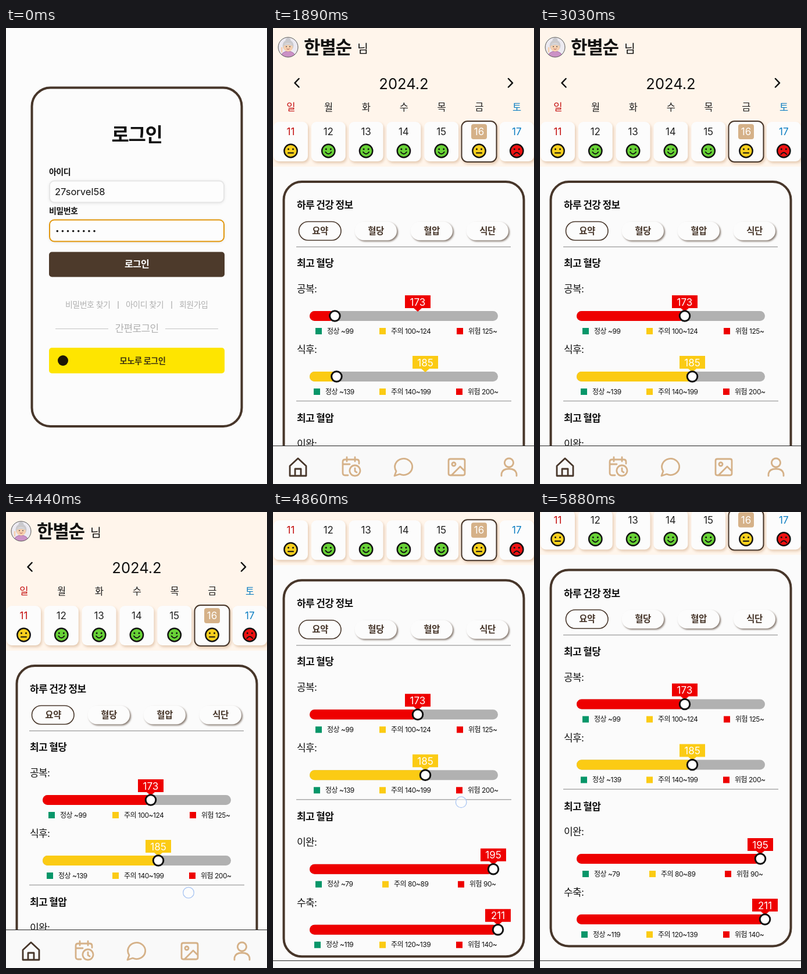
Recreate the animation shown at these times as an HTML page. Size 449 px wide and 783 px high, loop 5910 ms.

```html
<!DOCTYPE html>
<html lang="ko">
<head>
<meta charset="utf-8">
<title>로그인과 하루 건강 정보</title>
<style>
  html, body { margin: 0; width: 100%; height: 100%; overflow: hidden; background: #fcfcfc; }
  svg { display: block; }
  text { font-family: Inter, "Noto Sans CJK KR", "Noto Sans CJK", sans-serif; white-space: pre; }
  .ko { letter-spacing: -.04em; }
  .soft { filter: drop-shadow(0 1px 2px rgba(0, 0, 0, .08)); }
  .day { filter: drop-shadow(2px 3px 2px rgba(190, 140, 95, .4)); }
  .pill { filter: drop-shadow(2px 2px 1.5px rgba(60, 40, 25, .6)); }
  #stage { position: relative; width: 449px; height: 783px; overflow: hidden; }
  #stage > svg { position: absolute; left: 0; top: 0; }
  #dialog { position: absolute; left: 12px; width: 425px; overflow: hidden; border-radius: 24px;
    background: #fafafa; box-shadow: 0 0 3px rgba(0, 0, 0, .35); }
  #dialog text { font-family: "Noto Sans", "Noto Sans CJK KR", "Noto Sans CJK", sans-serif; }
</style>
</head>
<body>
<div id="stage">
  <svg id="login" width="449" height="783"></svg>
  <svg id="home" width="449" height="783"></svg>
  <div id="dialog"></div>
</div>
<script>
const LOOP = 5910;
const BROWN = '#47362a', TAN = '#d5b188', RED = '#ee0000', YELLOW = '#fbcb14', GREEN = '#079669';
const $ = id => document.getElementById(id);
const clamp = (v, lo = 0, hi = 1) => Math.min(hi, Math.max(lo, v));

const text = (x, y, size, str, { fill = '#111', weight = 400, anchor = 'start' } = {}) =>
  `<text x="${x}" y="${y}" font-size="${size}" fill="${fill}" font-weight="${weight}" text-anchor="${anchor}"` +
  `${/[가-힣]/.test(str) ? ' class="ko"' : ''}>${str}</text>`;
const bold = (x, y, size, str, fill = '#111') => text(x, y, size, str, { fill, weight: 700 });
const boldMid = (x, y, size, str, fill = '#111') => text(x, y, size, str, { fill, weight: 700, anchor: 'middle' });
const mid = (x, y, size, str, fill = '#111') => text(x, y, size, str, { fill, anchor: 'middle' });
const rect = (x, y, w, h, rx, fill, extra = '') =>
  `<rect x="${x}" y="${y}" width="${w}" height="${h}" rx="${rx}" fill="${fill}" ${extra}/>`;
const circle = (x, y, r, fill, extra = '') => `<circle cx="${x}" cy="${y}" r="${r}" fill="${fill}" ${extra}/>`;
const path = (d, stroke, width, extra = '') =>
  `<path d="${d}" fill="none" stroke="${stroke}" stroke-width="${width}" ${extra}/>`;
const ROUND = 'stroke-linecap="round" stroke-linejoin="round"';

function loginScreen() {
  const gray = '#b0b0b0';
  const dots = Array.from({ length: 8 }, (_, i) => circle(88.3 + i * 9.1, 348.8, 1.8, '#111')).join('');
  return rect(0, 0, 449, 783, 0, '#fcfcfc') + `<g id="form">` +
    rect(44.5, 102.5, 361, 581.5, 32, '#fcfcfc', `stroke="${BROWN}" stroke-width="4"`) +
    boldMid(225, 195, 33, '로그인') +
    bold(74, 251.5, 14, '아이디') +
    rect(75, 262.5, 300, 37, 8, '#fdfdfd', 'class="soft" stroke="#e6e6e6" stroke-width="2"') +
    text(84, 287, 16.5, '27sorvel58') +
    bold(74, 318.5, 14, '비밀번호') +
    rect(75, 329.5, 300, 37, 8, '#fdfdfd', 'id="password" class="soft" stroke-width="2"') + dots +
    rect(155, 337, 1.6, 22, 0, '#111', 'id="caret"') +
    rect(74, 384.5, 302, 43, 5, '#4d3a2b') +
    rect(74, 384.5, 302, 43, 5, '#fff', 'id="press"') +
    boldMid(225, 411, 16, '로그인', '#fff') +
    [[102, '비밀번호 찾기'], [206, '아이디 찾기'], [298, '회원가입']]
      .map(([x, s]) => text(x, 480, 14, s, { fill: gray })).join('') +
    path('M193 469V482M285 469V482', gray, 1.3) +
    path('M85 516.5H176M274 516.5H365', '#c4c4c4', 1) +
    mid(225, 521.5, 17, '간편로그인', gray) +
    rect(74, 549, 302, 44, 5, '#fee500') +
    circle(98, 571, 9, '#1d1606') +
    boldMid(235, 577, 14.4, '모노루 로그인', '#43390f') + '</g>';
}

function face(x, y, mood) {
  const fill = { ok: '#f7cf1d', good: '#68d236', bad: '#ee1111' }[mood];
  const mouth = { ok: 'M-4.5 3.5H4.5', good: 'M-5 2Q0 8.5 5 2', bad: 'M-5 6Q0 -.5 5 6' }[mood];
  return `<g transform="translate(${x} ${y})">` + circle(0, 0, 11.2, fill, 'stroke="#111" stroke-width="2.4"') +
    circle(-4, -3, 1.5, '#111') + circle(4, -3, 1.5, '#111') + path(mouth, '#111', 2, ROUND) + '</g>';
}

function calendar() {
  const moods = ['ok', 'good', 'good', 'good', 'good', 'ok', 'bad'];
  return [...'일월화수목금토'].map((name, i) => {
    const x = 30.5 + i * 64.8, selected = i === 5;
    const color = i === 0 ? '#c40d0d' : i === 6 ? '#0a7dc2' : '#222';
    const tile = selected
      ? rect(x - 30, 160, 60, 70, 10, '#fcfcfc', `class="day" stroke="${BROWN}" stroke-width="2"`) +
        rect(x - 13.5, 165, 27, 26, 4, TAN)
      : rect(x - 29.5, 161, 59, 68, 9, '#fcfcfc', 'class="day"');
    return mid(x, 142, 16.5, name, color) + tile +
      mid(x, 184, 17, String(11 + i), selected ? '#fff' : color) + face(x, 211, moods[i]);
  }).join('');
}

function avatar() {
  return `<clipPath id="round">${circle(26, 33, 17, '#fff')}</clipPath><g clip-path="url(#round)">` +
    circle(26, 33, 17, '#eceaf1') +
    circle(26, 21.5, 4.5, '#c9c9cd') + circle(26, 30, 9.5, '#c9c9cd') +
    path('M13 52Q14 40 26 40T39 52Z', '#a86fa5', 1, 'style="fill:#cb92c6"') +
    circle(26, 32.5, 8, '#f6cfae') + path('M18 30Q21 25 26 25T34 30Q26 27 18 30Z', '#c9c9cd', 1, 'style="fill:#d8d8dc"') +
    circle(23, 32, 1, '#555') + circle(29, 32, 1, '#555') + path('M23.5 35.5Q26 38 28.5 35.5', '#b0605a', 1) +
    path('M15 41V34', '#f6cfae', 2.5, ROUND) +
    '</g>' + circle(26, 33, 17, 'none', 'stroke="#555" stroke-width="1"');
}

const gauges = [
  { y: 494.5, name: '공복:', value: 173, end: 249, color: RED, keys: [73, 183, 316], ranges: ['~99', '100~124', '125~'] },
  { y: 598.5, name: '식후:', value: 185, end: 262, color: YELLOW, keys: [70, 183, 315], ranges: ['~139', '140~199', '200~'] },
  { y: 760, name: '이완:', value: 195, end: 379, color: RED, keys: [73, 188, 318], ranges: ['~79', '80~89', '90~'] },
  { y: 864, name: '수축:', value: 211, end: 387, color: RED, keys: [71, 183, 315], ranges: ['~119', '120~139', '140~'] },
];

function gauge({ y, name, value, end, color, keys, ranges }) {
  const levels = [['정상', GREEN], ['주의', YELLOW], ['위험', RED]];
  return text(41, y - 40.5, 17, name) +
    rect(63, y - 8.5, 324, 17, 8.5, '#b1b1b1') +
    rect(63, y - 8.5, 0, 17, 8.5, color, 'class="fill"') +
    `<path d="M${end - 22} ${y - 35.5}h44v22h-15l-7 6-7-6h-15z" fill="${color}"/>` +
    mid(end, y - 18, 17, String(value), '#fff') +
    circle(63, y, 8.8, '#fff', 'class="thumb" stroke="#111" stroke-width="3"') +
    levels.map(([label, tone], i) => rect(keys[i], y + 20.5, 11, 11, 0, tone) +
      text(keys[i] + 20, y + 30, 12, `${label} ${ranges[i]}`)).join('');
}

function tabs() {
  return ['요약', '혈당', '혈압', '식단'].map((label, i) => {
    const look = i ? 'class="pill"' : `stroke="${BROWN}" stroke-width="1.6"`;
    return rect(44.5 + i * 96, 332.5, 72.5, 32, 16, '#fcfcfc', look) + boldMid(81 + i * 96, 353.5, 15.5, label, BROWN);
  }).join('');
}

function navBar() {
  const icons = [
    [43, 'M-14 -2L0 -15L14 -2V15H-14ZM-5 15V3H5V15'],
    [135, 'M-6 14H-11Q-15 14 -15 10V-9Q-15 -13 -11 -13H9Q13 -13 13 -9V-6M-8 -17V-10M6 -17V-10M-15 -5H-3M6 -3A9 9 0 1 1 5.9 -3M6 2V7L9 9'],
    [224, 'M-15 15L-12 7A15 14 0 1 1 -6 12Z'],
    [316, 'M-11 -14H11Q14 -14 14 -11V11Q14 14 11 14H-11Q-14 14 -14 11V-11Q-14 -14 -11 -14ZM-9 14L6 -1L14 7M-5 -8A3 3 0 1 1 -5.1 -8'],
    [406, 'M0 -15A7.5 7.5 0 1 1 -.1 -15ZM-13 15V12Q-12 3 0 3T13 12V15'],
  ];
  return rect(0, 717, 449, 70, 0, '#f9f9f9') + path('M0 717.5H449', '#222', 1) +
    icons.map(([x, d], i) => path(d, i ? TAN : BROWN, 2.8, `${ROUND} transform="translate(${x} 754)"`)).join('');
}

function homeScreen() {
  return rect(0, 0, 449, 783, 0, '#fbfbfb') + '<g id="page">' +
    rect(0, 0, 449, 238, 0, '#fff5eb') + avatar() +
    bold(53, 44, 31, '한별순') + text(145, 43, 20.5, '님') +
    mid(225, 105, 25.5, '2024.2') +
    path('M44.5 87L37.5 94.3L44.5 101.5M405 87L412 94.3L405 101.5', '#111', 2.5, ROUND) +
    calendar() +
    rect(18.5, 264, 413, 646, 31, '#fbfbfb', `stroke="${BROWN}" stroke-width="4"`) +
    bold(41, 310, 17, '하루 건강 정보') + tabs() +
    path('M40 375.7H409M40 640.5H410', '#aaa', 1.4) +
    bold(41, 410, 17, '최고 혈당') + bold(41, 676, 17, '최고 혈압') +
    gauges.map(gauge).join('') + '</g>' +
    `<g id="nav">${navBar()}</g>` +
    circle(0, 0, 9.3, 'rgba(255,255,255,.5)', 'id="touch" stroke="#a9c5f2" stroke-width="1.3"');
}

function dialogBody() {
  return '<svg width="425" height="257" viewBox="12 515 425 257">' +
    bold(36, 567, 19, '로그인 정보 저장') +
    path('M395.5 555L410.5 570M410.5 555L395.5 570', '#777', 1.5, ROUND) +
    text(35, 616, 15.6, '이 사이트에서 사용하는 내 사용자 이름과 비밀번호가', { fill: '#222' }) +
    text(35, 639, 15.6, '포함됩니다.', { fill: '#222' }) +
    circle(48, 670, 10, 'none', 'stroke="#999" stroke-width="1.4"') +
    text(80, 677, 17.5, 'Norvane Gate로 로그인', { fill: '#222' }) +
    boldMid(129, 741, 19.5, '안 함') + boldMid(319, 741, 19.5, '기억하기') +
    path('M224.5 725V743', '#ddd', 1) + '</svg>';
}

$('login').innerHTML = loginScreen();
$('home').innerHTML = homeScreen();
$('dialog').innerHTML = dialogBody();
const fills = document.querySelectorAll('.fill'), thumbs = document.querySelectorAll('.thumb');

function drawLogin(t) {
  const blur = clamp((t - 900) / 300);
  const mix = (a, b) => Math.round(a + (b - a) * blur);
  $('form').style.display = t < 1650 ? '' : 'none';
  $('caret').style.display = t >= 60 && t < 930 ? '' : 'none';
  $('password').setAttribute('stroke', `rgb(${mix(226, 230)},${mix(151, 230)},${mix(12, 230)})`);
  $('press').setAttribute('opacity', .08 * Math.sin(Math.PI * blur));
}

function drawGauges(t) {
  const grow = 1 - (1 - clamp((t - 1800) / 800)) ** 2.2;
  gauges.forEach(({ end }, i) => {
    const length = (end - 63) * grow;
    fills[i].setAttribute('width', length);
    thumbs[i].setAttribute('cx', 63 + length);
  });
}

function drawScroll(t) {
  const START = 4440, RELEASE = 5220, MAX_SCROLL = 164.5, SLOP = 9;
  const held = clamp(t - START, 0, RELEASE - START);
  const travel = .3608 * held + 2.16e-5 * held * held;
  const drag = Math.max(0, travel - SLOP);
  const scroll = Math.min(MAX_SCROLL, drag);
  // Pulling past the end stretches the page from its bottom edge, then springs back.
  const spring = (1 - clamp((t - RELEASE) / 240)) ** 2;
  const stretch = 1 + .0062 * clamp((drag - MAX_SCROLL) / 97) * spring;
  $('page').setAttribute('transform', `translate(0 783) scale(1 ${stretch}) translate(0 ${-783 - scroll})`);
  $('nav').setAttribute('transform', `translate(0 ${Math.min(53, scroll)})`);
  $('touch').style.display = t >= START && t < RELEASE ? '' : 'none';
  $('touch').setAttribute('transform', `translate(${314 + 39 * (held / 720) ** 2.6} ${654 - travel})`);
}

function drawDialog(t) {
  const HEIGHT = 257;
  const opening = clamp((t - 2070) / 270), closing = clamp((t - 2700) / 330);
  const shift = HEIGHT * ((1 - opening) ** 3 + closing ** 2);
  const style = $('dialog').style;
  style.display = opening > 0 && closing < 1 ? '' : 'none';
  style.top = 515 + shift + 'px';
  style.height = HEIGHT - shift + 'px';
  style.opacity = Math.min(clamp(opening * 3), clamp((1 - closing) * 4));
}

function draw(t) {
  $('home').style.display = t >= 1800 ? '' : 'none';
  drawLogin(t);
  drawGauges(t);
  drawScroll(t);
  drawDialog(t);
}

function frame() {
  draw(performance.now() % LOOP);
  requestAnimationFrame(frame);
}
frame();
</script>
</body>
</html>
```
